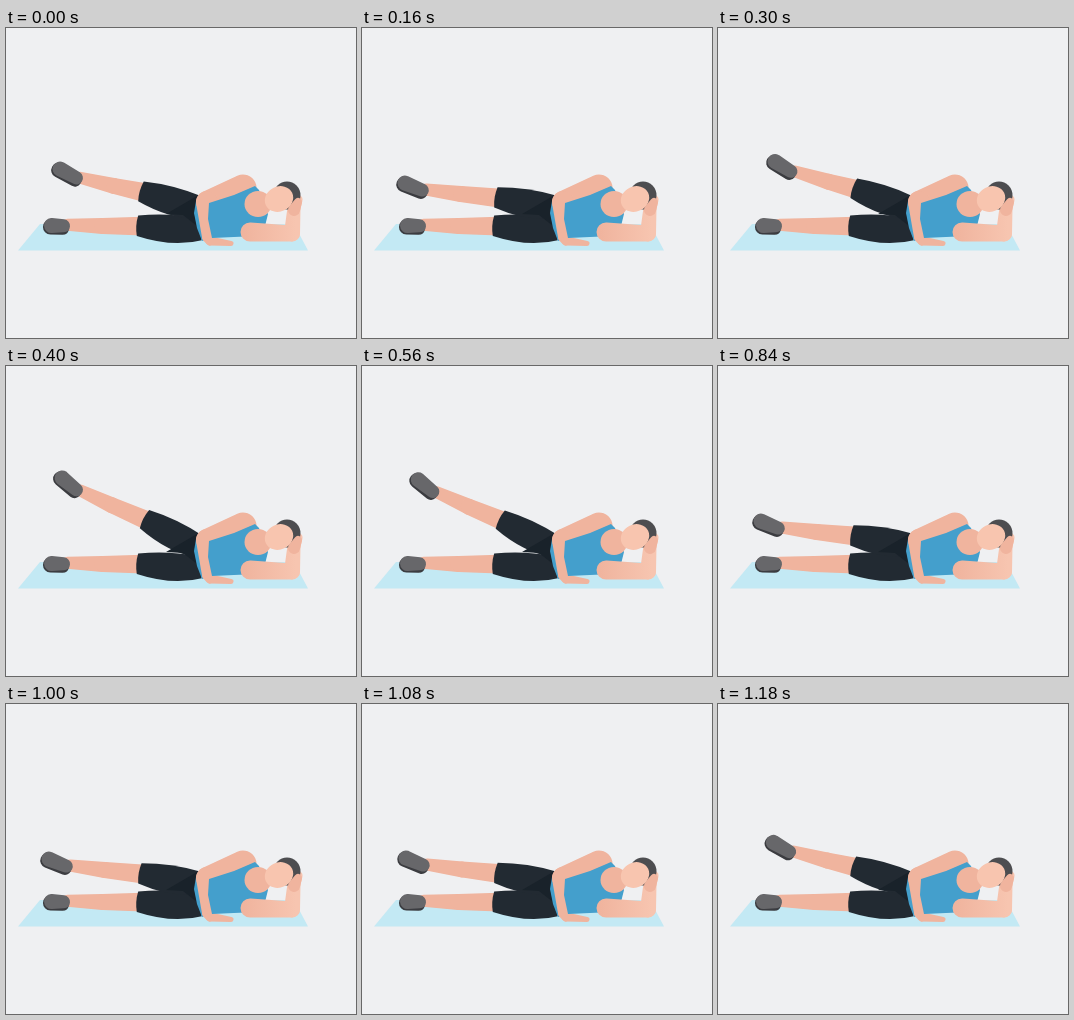
Animation, 350 px wide and 310 px high, one loop 1.22 s. Source, as an HTML page with a canvas:

```html
<!DOCTYPE html>
<html lang="en">
<head>
<meta charset="utf-8">
<title>Side leg raise</title>
<style>
html, body { margin: 0; width: 100%; height: 100%; overflow: hidden; background: #eff0f2; }
canvas { display: block; }
</style>
</head>
<body>
<canvas id="stage" width="350" height="310"></canvas>
<script>
const ctx = document.getElementById('stage').getContext('2d');
const LOOP = 1220;
const DEG = Math.PI / 180;
const SKIN = '#f0b49e', FACE = '#f8c5af', SHIRT = '#449fcc', SHORTS = '#222a32';
const INNER = '#19222a', SHOE = '#67676a', SOLE = '#3b3c40', HAIR = '#4d4d50';
const BG = '#eff0f2', MAT = '#c3e9f4';

const forearmGlow = ctx.createLinearGradient(238, 0, 290, 0);
forearmGlow.addColorStop(0, SKIN);
forearmGlow.addColorStop(1, '#f7c5b0');

// Tapered limb: the hull of each pair of neighbouring circles [x, y, r].
function limb(color, ...circles) {
  ctx.fillStyle = color;
  for (let i = 1; i < circles.length; i++) {
    const [ax, ay, ar] = circles[i - 1], [bx, by, br] = circles[i];
    const dir = Math.atan2(by - ay, bx - ax);
    const spread = Math.acos((ar - br) / Math.hypot(bx - ax, by - ay));
    ctx.beginPath();
    ctx.arc(ax, ay, ar, dir + spread, dir - spread + 2 * Math.PI);
    ctx.arc(bx, by, br, dir - spread, dir + spread);
    ctx.fill();
  }
}

function polygon(color, ...points) {
  ctx.beginPath();
  points.forEach(p => ctx.lineTo(...p));
  ctx.fillStyle = color;
  ctx.fill();
}

function ellipse(color, x, y, rx, ry, turn = 0) {
  ctx.beginPath();
  ctx.ellipse(x, y, rx, ry, turn * DEG, 0, 2 * Math.PI);
  ctx.fillStyle = color;
  ctx.fill();
}

function ramp(t, start, length) {
  const x = Math.min(1, Math.max(0, (t - start) / length));
  return (1 - Math.cos(Math.PI * x)) / 2;
}

// 0 = leg lowered, 1 = leg raised
function liftAt(t) {
  if (t < 160) return 1 - ramp(t, -150, 255);
  if (t < 460) return ramp(t, 190, 210);
  if (t < 900) return 1 - ramp(t, 530, 255);
  return ramp(t, 1050, 290);
}

// Drawn along the negative x axis from the hip.
function leg(hipX, hipY, angle, reach, toeX, toeY) {
  ctx.save();
  ctx.translate(hipX, hipY);
  ctx.rotate(angle * DEG);
  limb(SKIN, [-reach, 0, 6], [-reach + 35, 0.5, 8], [-50, 0, 9.5]);

  ctx.beginPath();
  ctx.moveTo(-55, -10.5);
  ctx.quadraticCurveTo(-25, -14, 4, -9);
  ctx.lineTo(9, 13);
  ctx.quadraticCurveTo(-20, 21, -56, 10);
  ctx.quadraticCurveTo(-58, 0, -55, -10.5);
  ctx.fillStyle = SHORTS;
  ctx.fill();

  ctx.translate(-reach, 0);
  limb(SOLE, [toeX - 1, toeY + 1.5, 7.5], [-5, 3.5, 6.5]);
  limb(SHOE, [toeX, toeY, 7.5], [-4, 1, 6.5]);
  ctx.restore();
}

function torso() {
  polygon(SHIRT, [190, 173], [188, 185], [191, 200], [196, 213], [206, 210], [206, 173]);
  limb(SKIN, [237, 160, 13.5], [201, 174, 11], [201, 209, 5], [204, 213, 4.5], [225, 215.5, 2.5]);
  polygon(SHIRT, [203, 175], [228, 167], [249, 158], [253, 162], [262, 186],
    [259, 198], [250, 208], [206, 210], [202, 191]);
  ellipse(SKIN, 252, 176, 13.5, 13);
  limb(forearmGlow, [244, 204, 9.5], [286, 205.5, 8], [288, 180, 6.5], [291, 172, 5.5]);
}

function head() {
  ellipse(HAIR, 281, 167.5, 13.5, 14);
  limb(SKIN, [288, 182, 6], [292, 174, 4]);
  ellipse(FACE, 273, 171, 14.5, 12.5, -25);
}

function draw(t) {
  const lift = liftAt(t);
  ctx.fillStyle = BG;
  ctx.fillRect(0, 0, 350, 310);
  polygon(MAT, [12, 222.5], [34, 196], [288, 196], [302, 222.5]);
  leg(187, 199, 1, 125.5, -16, 1);
  leg(189, 176, 6.6 + 17.6 * lift, 125.5 - 9 * Math.sin(Math.PI * lift), -22, -4);
  polygon(INNER, [160, 186], [191, 168], [191, 198], [177, 187]);
  torso();
  head();
}

const start = performance.now();
function frame() {
  draw((performance.now() - start) % LOOP);
  requestAnimationFrame(frame);
}
frame();
</script>
</body>
</html>
```
